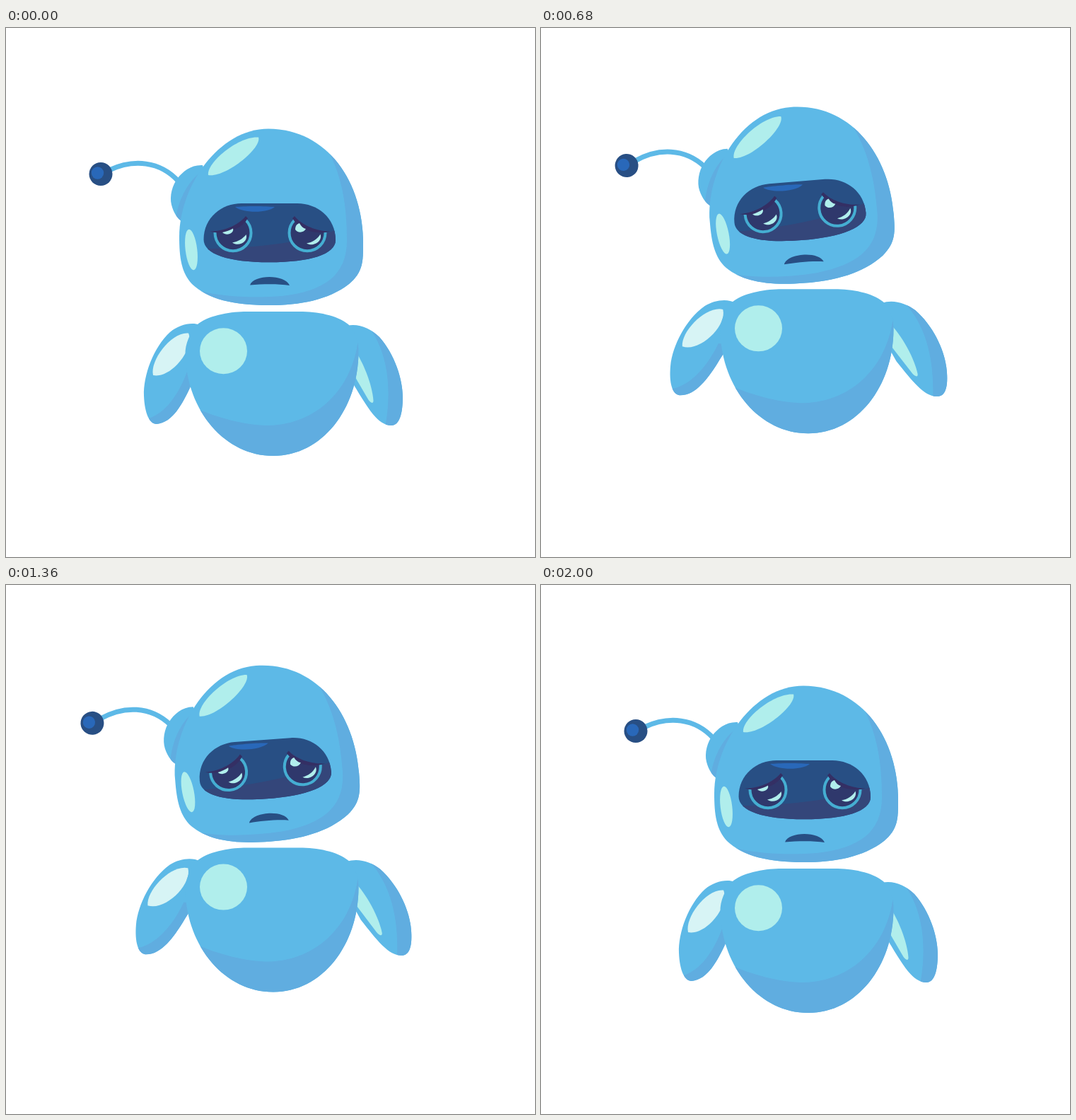
An HTML page with a canvas that plays this animation: 748x748 px, repeating every 2200 ms.

```html
<!DOCTYPE html>
<html lang="en">
<head>
<meta charset="utf-8">
<title>Sad robot</title>
<style>
html, body { margin: 0; width: 100%; height: 100%; overflow: hidden; background: #fff; }
canvas { display: block; width: 748px; height: 748px; }
</style>
</head>
<body>
<canvas id="stage" width="748" height="748"></canvas>
<script>
const ctx = document.getElementById('stage').getContext('2d');
const LOOP = 2200, MOVE = 2000, STEP = 40;
const LIFT = 42, TILT = -6, SWING = 10;

const C = {
  skin: '#5db9e7', shade: '#60ade0', mint: '#b0eeec', pale: '#d7f4f5',
  navy: '#284f84', blue: '#2968b9', plum: '#34467a', iris: '#2f386c', lid: '#342f64', ring: '#45aed2'
};

const shape = d => new Path2D(d);

const body = shape('M272 418C290 405 320 401 340 401H415C440 401 468 406 484 419C494 428 499 445 498.5 458C498 539 447 605 378 605C310 605 256 542 253.5 462C253 447 260 430 272 418Z');
const bodyShade = shape('M262 535C300 552 340 562 372 562C440 560 490 510 498 440H520V620H260Z');

const armL = shape('M274 420C262 415 244 420 232 430C208 452 194 492 195 520C196 545 203 560 213 560C236 558 250 530 260 509C268 490 280 470 285 450Z');
const armLShade = shape('M198 553C222 548 245 520 258 480H290L260 570H205Z');
const armLShine = shape('M208 491C203 470 234 429 258 431.5C267 453 234 496 208 491Z');

const armR = shape('M482 421C498 417 516 425 528 437C550 462 561 497 561 522C561 546 556 562 545 562C526 562 512 538 492 505L470 450Z');
const armRShade = shape('M514 424C540 460 546 510 536 565H572V424Z');
const armRShine = shape('M488 448C505 470 518 505 519.5 527C519.5 532 515 530 512 525L487 482Z');

const head = shape('M371 142.5C455 143 505 218 505 305C505 330 505 345 485 362C455 385 415 392 372 392C320 392 285 383 263 362C248 346 245 325 245 295C245 225 300 142.5 371 142.5Z');
const headShade = shape('M455 172C475 210 482 250 482 300C482 350 450 372 390 379C350 382 305 380 275 372L260 400H520V170Z');
const headShine = shape('M286 208C283 190 330 152 357 154.5C362 170 310 212 286 208Z');
const bump = shape('M278 194C262 193 250 203 243 212C235 222 231 238 234 250C237 262 243 270 249 274L300 260Z');
const bumpShade = shape('M280 200C258 215 245 240 240 268L262 280L290 200Z');
const antenna = shape('M146 201C180 185 218 188 244 217');

const visor = shape('M333 248H412C440 248 466 268 466 300C466 320 430 331.3 372 331.3C315 331.3 279.5 320 279.5 299C279.5 268 305 248 333 248Z');
const visorShade = shape('M275 312C340 312 420 305 470 284V340H275Z');
const visorShine = shape('M324 253C335 251.5 368 251.5 380 253C370 262 335 262 324 253Z');
const mouth = shape('M345 363.5C350 348 395 348 401 364C385 361.5 362 362 345 363.5Z');

// The right eye mirrors the left one, apart from its glints.
const MIRROR = 747;
const eyeOpen = shape('M280 289C308 290 331 282 341 266L360 262V330H280Z');
const eyeLid = shape('M288 287.5C305 288 328 280 339 266L342 269C332 286 308 293 288 287.5Z');
const glints = [
  shape('M306 289C311 288 317 286 321 283.5C323 290 312 295 306 289Z'),
  shape('M320 303.5C328 302 335 298 339.5 292C343 302 329 310 320 303.5Z'),
  shape('M409 285C409 280 411 277 415 276C417 280 420 283 424 284C421 290 412 290 409 285Z'),
  shape('M425 304.5C433 303 440 299 444.5 291.5C448 302 434 310 425 304.5Z')
];

function fill(path, color) {
  ctx.fillStyle = color;
  ctx.fill(path);
}

function oval(x, y, rx, ry, turn = 0) {
  const p = new Path2D();
  p.ellipse(x, y, rx, ry, turn, 0, Math.PI * 2);
  return p;
}

function inside(path, draw) {
  ctx.save();
  ctx.clip(path);
  draw();
  ctx.restore();
}

function shaded(path, color, dark, darkColor) {
  fill(path, color);
  inside(path, () => fill(dark, darkColor));
}

function turned(deg, x, y, draw) {
  ctx.save();
  ctx.translate(x, y);
  ctx.rotate(deg * Math.PI / 180);
  ctx.translate(-x, -y);
  draw();
  ctx.restore();
}

function drawArm(arm, dark, shine, color) {
  shaded(arm, C.skin, dark, C.shade);
  inside(arm, () => fill(shine, color));
}

function drawEye() {
  inside(eyeOpen, () => {
    const ball = oval(321, 289.7, 25.5, 25.5);
    fill(ball, C.iris);
    ctx.strokeStyle = C.ring;
    ctx.lineWidth = 4;
    ctx.stroke(ball);
  });
  fill(eyeLid, C.lid);
}

function drawEyes() {
  drawEye();
  ctx.save();
  ctx.translate(MIRROR, 0);
  ctx.scale(-1, 1);
  drawEye();
  ctx.restore();
  glints.forEach(g => fill(g, C.mint));
}

function drawHead() {
  ctx.strokeStyle = C.skin;
  ctx.lineWidth = 7;
  ctx.stroke(antenna);
  fill(oval(134, 206.5, 16.5, 16.5), C.navy);
  fill(oval(129.5, 205, 8.7, 8.7), C.blue);

  shaded(bump, C.skin, bumpShade, C.shade);
  shaded(head, C.skin, headShade, C.shade);
  fill(headShine, C.mint);
  fill(oval(262, 313.5, 8.3, 29, -0.12), C.mint);

  shaded(visor, C.navy, visorShade, C.plum);
  fill(visorShine, C.blue);
  drawEyes();
  fill(mouth, C.navy);
}

function render(time) {
  const t = Math.min(MOVE, Math.floor((time % LOOP) / STEP) * STEP);
  const u = 1 - Math.abs(t / (MOVE / 2) - 1);
  const p = u * u * (3 - 2 * u);

  ctx.fillStyle = '#fff';
  ctx.fillRect(0, 0, 748, 748);
  ctx.save();
  ctx.translate(0, -LIFT * p);
  turned(SWING * p, 271, 425, () => drawArm(armL, armLShade, armLShine, C.pale));
  turned(-SWING * p, 482, 425, () => drawArm(armR, armRShade, armRShine, C.mint));
  shaded(body, C.skin, bodyShade, C.shade);
  fill(oval(307.5, 456.7, 33.5, 32.5), C.mint);
  turned(TILT * p, 378, 379, drawHead);
  ctx.restore();
}

let start;
function tick(now) {
  if (start === undefined) start = now;
  render(now - start);
  requestAnimationFrame(tick);
}
render(0);
requestAnimationFrame(tick);
</script>
</body>
</html>
```
